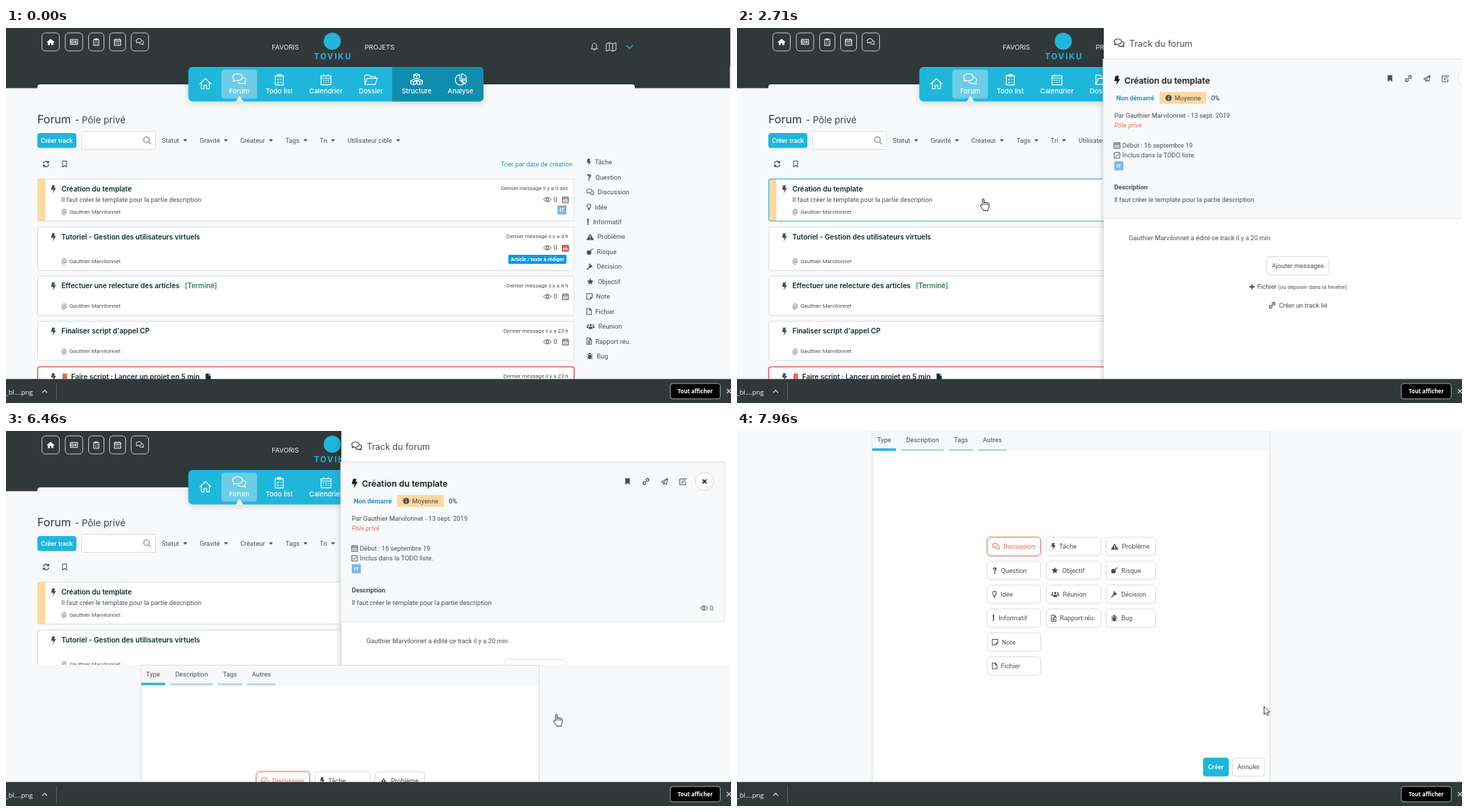
An HTML page for the animation above (8000 ms loop, 1040x539 px).

```html
<!DOCTYPE html>
<html lang="fr">
<head>
<meta charset="utf-8">
<title>Forum</title>
<style>
html, body { margin: 0; width: 100%; height: 100%; overflow: hidden; background: #f7f9fb; }
svg { display: block; width: 100%; height: 100%; }
text { font-family: Roboto, sans-serif; white-space: pre; }
.head { font-family: Inter, sans-serif; }
#panel, #modal, #cursor, #hand, #arrow, #cardHover, #linkHover { animation: 8s linear infinite; }
#panel { animation-name: panel; }
#modal { animation-name: modal; }
#cursor { animation-name: cursor; }
#hand { animation-name: hand; animation-timing-function: step-end; }
#arrow { animation-name: arrow; animation-timing-function: step-end; }
#cardHover { animation-name: cardHover; }
#linkHover { animation-name: linkHover; }

@keyframes panel {
  0% { transform: translateX(600px); }
  26% { transform: translateX(560px); animation-timing-function: ease-in; }
  28.5%, 29.749% { transform: translateX(464px); }
  29.75% { transform: translateX(370px); }
  31.875%, 33.124% { transform: translateX(194px); }
  33.125% { transform: translateX(94px); }
  33.875% { transform: translateX(46px); animation-timing-function: ease-out; }
  35%, 100% { transform: none; }
}
@keyframes modal {
  0%, 77% { transform: translateY(506px); animation-timing-function: ease-in; }
  80.75% { transform: translateY(337px); animation-timing-function: cubic-bezier(.3, .36, .6, .88); }
  85% { transform: translateY(17px); animation-timing-function: ease-out; }
  87%, 100% { transform: translateY(-1px); }
}
@keyframes cursor {
  0% { transform: translate(894px, 560px); }
  7.49% { transform: translate(894px, 560px); }
  7.5% { transform: translate(894px, 532px); animation-timing-function: cubic-bezier(.35, .1, .4, 1); }
  16.375%, 41.125% { transform: translate(353px, 245px); animation-timing-function: ease-in-out; }
  50.125%, 51.375% { transform: translate(719px, 419px); }
  53.75% { transform: translate(738px, 410px); animation-timing-function: ease-out; }
  60.625% { transform: translate(788px, 408px); }
  62.125%, 93% { transform: translate(789.4px, 406.7px); animation-timing-function: ease-in-out; }
  99.5%, 100% { transform: translate(755.6px, 395.2px); }
}
@keyframes hand {
  0% { opacity: 0; } 9.4% { opacity: 1; } 44.5% { opacity: 0; }
  53.1% { opacity: 1; } 82.5%, 100% { opacity: 0; }
}
@keyframes arrow {
  0% { opacity: 0; } 7.5% { opacity: 1; } 9.4% { opacity: 0; } 44.5% { opacity: 1; }
  53.1% { opacity: 0; } 82.5%, 100% { opacity: 1; }
}
@keyframes cardHover {
  0%, 15.6% { opacity: 0; } 18.6%, 42.5% { opacity: 1; } 45%, 100% { opacity: 0; }
}
@keyframes linkHover {
  0%, 52.8% { opacity: 0; } 55.5%, 84% { opacity: 1; } 86%, 100% { opacity: 0; }
}
</style>
</head>
<body>
<svg id="stage" viewBox="0 0 1040 539" preserveAspectRatio="none"></svg>
<script>
const CYAN = '#1fb6dc', INK = '#4a4e50', BLUE = '#2395bd', SAND = '#fcd9a0', DARK = '#31383a', LINE = '#d8dbdd';
const AUTHOR = 'Gauthier Marvilonnet', SPACE = 'Pôle privé';

const cube = 'l2.7 1.1v2.9l-2.7 1.2l-2.7-1.2v-2.9zm-2.7 1.1l2.7 1.2l2.7-1.2m-2.7 1.2v2.8';
const sheet = 'M2 .8H7L10 3.8V11.2H2ZM7 .8V3.8H10';
const dot = (x, y, r) => `M${x - r} ${y}a${r} ${r} 0 1 0 ${2 * r} 0a${r} ${r} 0 1 0 ${-2 * r} 0`;

// Icons live in a 12 by 12 box.
const solid = {
  bolt: 'M4 0H8.4L7.2 4H10L4.8 12L6 6.6H2.6Z',
  home: 'M6 1L0 6.4L.8 7.2L1.6 6.5V11H4.8V8H7.2V11H10.4V6.5L11.2 7.2L12 6.4Z',
  mark: 'M2.5 .8H9.5V11.2L6 8.4L2.5 11.2Z',
  warn: 'M6 1L12 11H0ZM5.3 4.4V7.6H6.7V4.4ZM5.3 8.5V9.8H6.7V8.5Z',
  bomb: dot(4.6, 7.4, 4) + 'M7 3L8.6 1.8L10 3.4L8.6 4.8ZM10 0L11 1.2L12.2 1L11.2 2.2L11.6 3.4L10.4 2.6Z',
  gavel: 'M5.5 .6L10.8 5.8L9.4 7.2L8.6 6.6L7 8.2L6.2 7.4L1.8 11.8L.4 10.4L4.8 6L4.2 5.2L5.8 3.6L4.2 2Z',
  star: 'M6 .4L7.7 4.1L11.7 4.5L8.7 7.2L9.6 11.2L6 9.1L2.4 11.2L3.3 7.2L.3 4.5L4.3 4.1Z',
  users: dot(6, 3.8, 1.9) + dot(1.4, 3.6, 1.3) + dot(10.6, 3.6, 1.3) +
    'M2.6 10.6V8.4C2.6 6 9.4 6 9.4 8.4V10.6ZM-.8 8.6V7C-.8 5.4 2 5 2.9 5.8L1.6 8.6ZM12.8 8.6V7C12.8 5.4 10 5 9.1 5.8L10.4 8.6Z',
  bug: 'M3.4 3.2A2.6 2.6 0 0 1 8.6 3.2ZM3 4.2H9V8.4A3 3 0 0 1 3 8.4ZM3 6.2H.4V7.2H3ZM9 6.2H11.6V7.2H9ZM3 5L.8 3L1.5 2.3L3.8 4.2ZM9 5L11.2 3L10.5 2.3L8.2 4.2ZM3.2 8.4L1 10.6L1.7 11.3L4 9.4ZM8.8 8.4L11 10.6L10.3 11.3L8 9.4Z',
  info: dot(6, 6, 5.5) + 'M5.2 2.6H6.8V4.2H5.2ZM5.2 5.2H6.8V9.4H5.2Z',
  page: 'M2 .8H7V4H10V11.2H2ZM7.8 .8L10 3.2H7.8Z',
  caret: 'M2 4H10L6 8.2Z'
};
const outline = {
  chat: 'M4.6 1C2.3 1 .4 2.3 .4 4C.4 4.8 .8 5.5 1.5 6.1L.8 7.6L3 6.9C7 7.4 8.8 5.6 8.8 4C8.8 2.3 7 1 4.6 1ZM9.6 4.2C11 4.6 11.7 5.5 11.7 6.5C11.7 7.2 11.3 7.9 10.7 8.4L11.4 10L9.2 9.3C7.4 9.7 5.6 9.2 4.6 8',
  house: 'M.5 6.3L6 1.2L11.5 6.3M2.2 5V11H4.8V7.5H7.2V11H9.8V5',
  card: 'M.3 2H11.7V10H.3ZM2 4.2H5.2V7.8H2ZM6.8 4.5H10M6.8 6H10M6.8 7.5H10',
  clip: 'M2 2H10V11.5H2ZM4.3 1H7.7V3H4.3ZM4 6L4.6 6.6L5.6 5.4M4 9L4.6 9.6L5.6 8.4M7 6H8.5M7 9H8.5',
  cal: 'M1 2.2H11V11.4H1ZM1 4.6H11M3.6 .6V2.6M8.4 .6V2.6M3 6.8H4.2M5.4 6.8H6.6M7.8 6.8H9M3 9H4.2M5.4 9H6.6M7.8 9H9',
  folder: 'M.5 10.5V2H4.5L5.8 3.4H10V5M.5 10.5L2.6 5H11.8L9.8 10.5Z',
  cubes: 'M6 .3' + cube + 'M3.1 6' + cube + 'M8.9 6' + cube,
  pie: 'M5.4 1.4A5 5 0 1 0 9.2 10.2L5.4 6.5ZM7 .6A5 5 0 0 1 11.8 5.4H7ZM7 6.8H11.8A5 5 0 0 1 10.4 10Z',
  bell: 'M6 .8C3.8 1.2 3 2.8 3 4.6C3 7 2.2 8 1.4 9H10.6C9.8 8 9 7 9 4.6C9 2.8 8.2 1.2 6 .8ZM4.8 10.2A1.3 1.3 0 0 0 7.2 10.2',
  map: 'M0 2.4L4 1V10L0 11.2ZM4 1L8 2.4V11.4L4 10M8 2.4L12 1V10L8 11.4',
  refresh: 'M1.2 5A5 5 0 0 1 10 3.2M10.8 7A5 5 0 0 1 2 8.8M10.4 .8V3.8H7.4M1.6 11.2V8.2H4.6',
  flag: solid.mark,
  eye: 'M.2 6C3 1.6 9 1.6 11.8 6C9 10.4 3 10.4 .2 6Z' + dot(6, 6, 1.9),
  bulb: 'M4.4 8.5C4.4 7 2.8 6 2.8 4A3.2 3.2 0 0 1 9.2 4C9.2 6 7.6 7 7.6 8.5ZM4.6 10H7.4M5 11.4H7',
  note: 'M1.2 1.2H10.8V7.6L7.6 10.8H1.2ZM10.8 7.6H7.6V10.8',
  file: sheet,
  report: sheet + 'M4 5.6H8M4 7.4H8M4 9.2H8',
  link: 'M4.4 7.6L7.6 4.4M5.6 3.4L7.4 1.6A2.1 2.1 0 0 1 10.4 4.6L8.6 6.4M6.4 8.6L4.6 10.4A2.1 2.1 0 0 1 1.6 7.4L3.4 5.6',
  plane: 'M.6 6.4L11.4 .8L9.6 10.8L6.2 8.8L4.4 11.2V7.8L11.4 .8L4.4 7.8Z',
  edit: 'M8 2H1V11H10V7M4.2 8L4.6 6L9.8 .8L11.4 2.4L6.2 7.6Z',
  check: 'M1 1H11V11H1ZM3.2 6L5.2 8L9 3.6',
  search: dot(5, 5, 4) + 'M8 8L11.5 11.5',
  cross: 'M2 2L10 10M10 2L2 10',
  plus: 'M6 1V11M1 6H11',
  down: 'M1 3.5L6 8.5L11 3.5',
  up: 'M1 8.5L6 3.5L11 8.5'
};

const rect = (x, y, w, h, fill, { stroke = 'none', r = 0, sw = 1, extra = '' } = {}) =>
  `<rect x="${x}" y="${y}" width="${w}" height="${h}" rx="${r}" fill="${fill}" stroke="${stroke}" stroke-width="${sw}" ${extra}/>`;
const path = (d, attrs) => `<path d="${d}" ${attrs}/>`;
// y is the middle of the capitals
const text = (x, y, str, { size = 9.3, fill = INK, weight = 400, head = false, anchor = 'start', extra = '' } = {}) =>
  `<text x="${x}" y="${y + size * .36}" font-size="${size}" fill="${fill}" font-weight="${weight}" text-anchor="${anchor}" class="${head ? 'head' : ''}" ${extra}>${str}</text>`;
const icon = (name, x, y, size = 10, color = INK, sw = 1) => {
  const k = size / 12, place = `transform="translate(${x - size / 2} ${y - size / 2}) scale(${k})"`;
  return solid[name]
    ? path(solid[name], `${place} fill="${color}" fill-rule="evenodd"`)
    : path(outline[name], `${place} fill="none" stroke="${color}" stroke-width="${sw / k}" stroke-linejoin="round"`);
};
const tagIT = (x, y) => rect(x, y, 13, 13, '#7db8e6') +
  text(x + 6.5, y + 6.5, 'IT', { size: 7, fill: '#fff', weight: 700, anchor: 'middle' });

// label, icon or sign, distance from icon to label
const types = {
  task: ['Tâche', 'bolt', 12], question: ['Question', '?', 13], talk: ['Discussion', 'chat', 16.3],
  idea: ['Idée', 'bulb', 12.3], info: ['Informatif', '!', 9.5], problem: ['Problème', 'warn', 16],
  risk: ['Risque', 'bomb', 15], decision: ['Décision', 'gavel', 15], goal: ['Objectif', 'star', 16.4],
  note: ['Note', 'note', 14], file: ['Fichier', 'file', 12.8], meeting: ['Réunion', 'users', 17.3],
  report: ['Rapport réu.', 'report', 13], bug: ['Bug', 'bug', 15]
};
const typeLabel = (key, x, y, fill = INK) => {
  const [label, sign, gap] = types[key], mid = x + (gap - 5) / 2;
  const mark = sign.length > 1 ? icon(sign, mid, y, sign === 'chat' || sign === 'warn' ? 11 : 10, fill)
    : text(mid, y, sign, { size: 12, weight: 900, anchor: 'middle', fill });
  return mark + text(x + gap, y, label, { fill });
};

function header() {
  const boxes = [[51, 25, 'home'], [84.5, 25, 'card'], [118, 22, 'clip'], [148, 23, 'cal'], [179, 25, 'chat']];
  const tabs = [[334.5, 'chat', 'Forum', 20], [392, 'clip', 'Todo list', 17], [459, 'cal', 'Calendrier', 17],
    [523.5, 'folder', 'Dossier', 19], [589, 'cubes', 'Structure', 18], [652, 'pie', 'Analyse', 18]];
  const menu = { size: 9.5, fill: '#eef1f1', head: true };
  return rect(0, 0, 1039, 86.5, DARK) + rect(45, 81, 857, 20, '#f7f9fb', { r: 4 }) +
    rect(1038.5, 55, 1.5, 32, '#f7f9fb') +
    boxes.map(([x, w, name]) => rect(x + .5, 7, w, 26, 'none', { stroke: '#c9cdce', r: 5 }) +
      icon(name, x + .5 + w / 2, 20, 11, '#fff')).join('') +
    text(381.3, 27.5, 'FAVORIS', menu) + text(514.5, 27.5, 'PROJETS', menu) +
    `<circle cx="468" cy="19" r="12.3" fill="${CYAN}"/>` +
    text(469, 41, 'TOVIKU', { size: 11.4, fill: CYAN, weight: 700, head: true, anchor: 'middle', extra: 'letter-spacing="1.8"' }) +
    icon('bell', 844, 27, 12, '#e6e9e9') + icon('map', 868, 27, 14, '#e6e9e9') + icon('down', 894.5, 27, 11, CYAN, 1.2) +
    rect(261.5, 56, 423.5, 49.5, CYAN, { r: 6, extra: 'filter="drop-shadow(0 2px 4px rgba(0,40,60,.18))"' }) +
    path('M554 56H679a6 6 0 0 1 6 6V99.5a6 6 0 0 1 -6 6H554Z', 'fill="#0f8dae"') +
    rect(309, 60, 51, 41.5, '#6dcde6', { r: 4 }) + path('M329.5 106L335 97.5L340.5 106Z', 'fill="#f7f9fb"') +
    icon('house', 286, 80, 18, '#fff', 1.2) +
    tabs.map(([x, name, label, size]) => icon(name, x, 74, size, '#fff', 1.2) +
      text(x, 90.5, label, { size: 9.6, fill: '#fff', weight: 500, head: true, anchor: 'middle' })).join('');
}

function toolbar() {
  const filters = [[223.5, 'Statut', 257], [278, 'Gravité', 315.5], [336, 'Créateur', 380], [401, 'Tags', 429.5],
    [450, 'Tri', 469], [490, 'Utilisateur cible', 562.5]];
  return text(45, 131, 'Forum', { size: 16, fill: '#26383c', head: true }) +
    text(99, 132, '- ' + SPACE, { size: 13.3, fill: '#3a474a', head: true }) +
    rect(45, 151, 56, 21.5, CYAN, { r: 4 }) +
    text(73, 161.5, 'Créer track', { fill: '#fff', weight: 500, anchor: 'middle' }) +
    rect(108.5, 148.5, 106, 26, '#fff', { stroke: LINE, r: 2 }) + icon('search', 202.5, 161.5, 12, '#adb1b3', 2) +
    filters.map(([x, label, caret]) => text(x, 161.5, label) + icon('caret', caret, 161.5, 9)).join('') +
    icon('refresh', 57.5, 195.5, 10, INK, 1.5) + icon('flag', 84, 195.5, 10) +
    text(813, 195.5, 'Trier par date de création', { fill: BLUE, anchor: 'end' });
}

function cards() {
  const list = [
    { y: 217, h: 60.5, title: 'Création du template', age: '0 sec', eye: 29.5, by: 47 },
    { y: 286, h: 62.5, title: 'Tutoriel - Gestion des utilisateurs virtuels', age: '3 h', eye: 30, by: 48.7 },
    { y: 356.5, h: 57, title: 'Effectuer une relecture des articles', age: '4 h', eye: 29.5, by: 43 },
    { y: 421.5, h: 57, title: "Finaliser script d'appel CP", age: '23 h', eye: 29.5, by: 43 },
    { y: 487, h: 57, title: 'Faire script : Lancer un projet en 5 min', age: '23 h', eye: 29.5, by: 43, urgent: true }
  ];
  return list.map(({ y, h, title, age, eye, by, urgent }, i) =>
    rect(45.5, y, 769.5, h, '#fff', { r: 3, stroke: urgent ? '#e9605c' : LINE, sw: urgent ? 1.6 : 1 }) +
    (i ? '' : rect(45, 217, 11.5, 60.5, SAND)) +
    icon('bolt', 68, y + 15, 11.5) +
    text(urgent ? 93.5 : 79.5, y + 14, title, { size: 10, fill: '#0d2c2d', weight: 600, head: true }) +
    text(79.5, y + by, '@', { size: 8.6 }) + text(91, y + by, AUTHOR, { size: 7.9 }) +
    text(806.5, y + 13.3, 'Dernier message il y a ' + age, { size: 7.8, anchor: 'end' }) +
    icon('eye', 776.5, y + eye, 11) + text(785.5, y + eye, '0') +
    icon('cal', 802.5, y + eye, 10, i === 1 ? '#a82a22' : INK, i === 1 ? 1.4 : 1)).join('') +
    text(79.5, 246.5, 'Il faut créer le template pour la partie description') + tagIT(791, 255) +
    rect(720.5, 326, 83.5, 13, '#0a9cde', { r: 1.5 }) +
    text(762.3, 332.5, 'Article / texte à rédiger', { size: 7.4, fill: '#fff', weight: 700, anchor: 'middle' }) +
    text(256.5, 370.5, '[Terminé]', { size: 10, fill: '#16703f', weight: 500, head: true }) +
    icon('mark', 84.3, 501.5, 11, '#e9605c') + icon('page', 290, 501.5, 11, '#0d2c2d') +
    rect(45.5, 217, 769, 60.5, 'none', { stroke: '#35b3d6', r: 3, extra: 'id="cardHover"' });
}

const sidebar = () => Object.keys(types).map((key, i) => typeLabel(key, 832.5, 193 + i * 21.43)).join('');

function panel() {
  const bold = { weight: 700 };
  const body = rect(0, -10, 570, 530, '#fff', { extra: 'filter="drop-shadow(-1px 0 5px rgba(0,0,0,.22))"' }) +
    rect(-1, 44.5, 550.5, 229.5, '#f7f9fa', { stroke: '#dcdfe1' }) +
    icon('chat', 22, 22, 15, '#333', 1.2) + text(36.5, 22, 'Track du forum', { size: 12.6, fill: '#444b4e', head: true }) +
    icon('bolt', 19, 75.5, 13.5, '#111') +
    text(29.5, 76, 'Création du template', { size: 12.2, fill: '#141718', weight: 600, head: true }) +
    icon('mark', 410.5, 72.5, 11) + icon('link', 437, 72.5, 10, INK, 1.4) + icon('plane', 463.5, 72.5, 10) +
    icon('edit', 490, 72.5, 11) +
    `<circle cx="521" cy="72.5" r="13" fill="#fff" stroke="${LINE}"/>` + icon('cross', 521, 72.5, 8.5, '#222', 1.9) +
    text(18, 100.5, 'Non démarré', { fill: BLUE, weight: 700 }) + rect(80, 92, 67, 17, SAND) +
    icon('info', 93, 100.5, 10) + text(101.5, 100.5, 'Moyenne') + text(154, 100.5, '0%', { fill: '#222' }) +
    text(15, 125.5, `Par ${AUTHOR} - 13 sept. 2019`) +
    text(15, 140, SPACE, { fill: '#e5714e', extra: 'font-style="italic"' }) +
    icon('cal', 19, 168.5, 10) + text(26.5, 168.5, 'Début : 16 septembre 19') +
    icon('check', 19, 183, 9.5) + text(26.5, 183, 'Inclus dans la TODO liste.') + tagIT(15, 191.5) +
    text(15, 228.5, 'Description', bold) +
    text(15, 247, 'Il faut créer le template pour la partie description') +
    icon('eye', 520, 254.5, 11) + text(528.7, 254.5, '0') +
    text(36, 301.5, `${AUTHOR} a édité ce track il y a 20 min`) +
    rect(233.5, 328.5, 89.5, 26.5, '#fff', { stroke: LINE, r: 5 }) +
    text(278.5, 342, 'Ajouter messages', { anchor: 'middle' }) +
    icon('plus', 212.7, 372, 9, INK, 1.9) + text(220, 372, 'Fichier') +
    text(250, 372.5, '(ou déposer dans la fenêtre)', { size: 7.9 }) +
    rect(229.5, 385.5, 98.5, 26.5, '#f2f9fb', { stroke: CYAN, r: 5, extra: 'id="linkHover"' }) +
    icon('link', 241.5, 398.5, 9.5, INK, 1.4) + text(251.3, 398.5, 'Créer un track lié');
  return `<g transform="translate(481 0)"><g id="panel">${body}</g></g>`;
}

function modal() {
  const tabs = [[194, 34, 'Type'], [236, 60.5, 'Description'], [304, 34.5, 'Tags'], [346, 40.5, 'Autres']];
  const columns = [
    [359, 76.5, ['talk', 'question', 'idea', 'info', 'note', 'file']],
    [443.5, 78.5, ['task', 'goal', 'meeting', 'report']],
    [529.5, 71, ['problem', 'risk', 'decision', 'bug']]
  ];
  const choice = (key, x, w, row) => {
    const y = 167 + row * 34.35, on = key === 'talk';
    return rect(x, y - 13.2, w, 26.5, '#fff', { stroke: on ? '#e5796a' : LINE, r: 5,
      extra: on ? 'filter="drop-shadow(0 0 1.5px rgba(229,100,80,.55))"' : '' }) +
      typeLabel(key, x + 6.7, y, on ? '#e5654f' : INK);
  };
  return '<g id="modal">' + rect(0, 0, 1040, 520, '#f6f8f9') +
    rect(194, .5, 570.5, 520, '#fefefe', { stroke: LINE }) + rect(194.5, 1, 569.5, 28.5, '#f5f7f8') +
    tabs.map(([x, w, label], i) => rect(x, i ? 27 : 26, w, i ? 2.5 : 3.5, i ? '#add7d4' : CYAN) +
      text(x + w / 2, 14, label, { anchor: 'middle' })).join('') +
    columns.map(([x, w, keys]) => keys.map((key, row) => choice(key, x, w, row)).join('')).join('') +
    rect(668.5, 470.5, 37, 27, CYAN, { r: 4 }) +
    text(687, 484, 'Créer', { fill: '#fff', weight: 500, anchor: 'middle' }) +
    rect(710.5, 471, 46.5, 26, '#fff', { stroke: LINE, r: 4 }) + text(733.7, 484, 'Annuler', { anchor: 'middle' }) + '</g>';
}

const downloads = () => rect(0, 504.5, 1040, 35, DARK) +
  text(38.5, 524, 'n_bl....png', { size: 9.4, fill: '#fff', anchor: 'end', extra: 'style="font-family:\'Open Sans\',sans-serif"' }) +
  icon('up', 55.5, 522.5, 8.5, '#d5d8d9', 1.2) + rect(72, 510, 1, 25, '#596062') +
  rect(953, 511, 71.5, 22, '#000', { stroke: '#a5a9aa', r: 3 }) +
  text(988.7, 522, 'Tout afficher', { size: 7.9, fill: '#fff', weight: 700, anchor: 'middle', extra: 'style="font-family:\'Open Sans\',sans-serif"' }) +
  icon('cross', 1037, 522, 9, '#d5d8d9', 1.2);

const cursor = () => '<g id="cursor" fill="#fff" stroke="#16181a" stroke-linejoin="round">' +
  path('M.4 .6V12.2L3 9.8L4.8 13.6L6.7 12.7L5 9H8.6Z', 'id="arrow" stroke-width=".9"') +
  '<g id="hand">' +
  path('M-1 10V1.4C-1 0 1.4 0 1.4 1.4V6C2 5 3.6 5.2 3.8 6.2C4.5 5.4 6 5.7 6.2 6.8C7.2 6.2 8.4 6.8 8.4 8V12C8.4 14 7.2 14.8 7 17.4H.4C.2 15.4 -2.4 13.6 -3.6 10.8C-4.2 9.2 -2.6 8.4 -1.8 9.2Z', 'stroke-width="1"') +
  path('M1.4 6V9.4M3.8 6.4V9.6M6.2 7V9.8', 'stroke-width=".8"') + '</g></g>';

document.getElementById('stage').innerHTML =
  rect(0, 0, 1040, 539, '#f7f9fb') + header() + toolbar() + cards() + sidebar() + panel() + modal() + downloads() + cursor();
</script>
</body>
</html>
```
